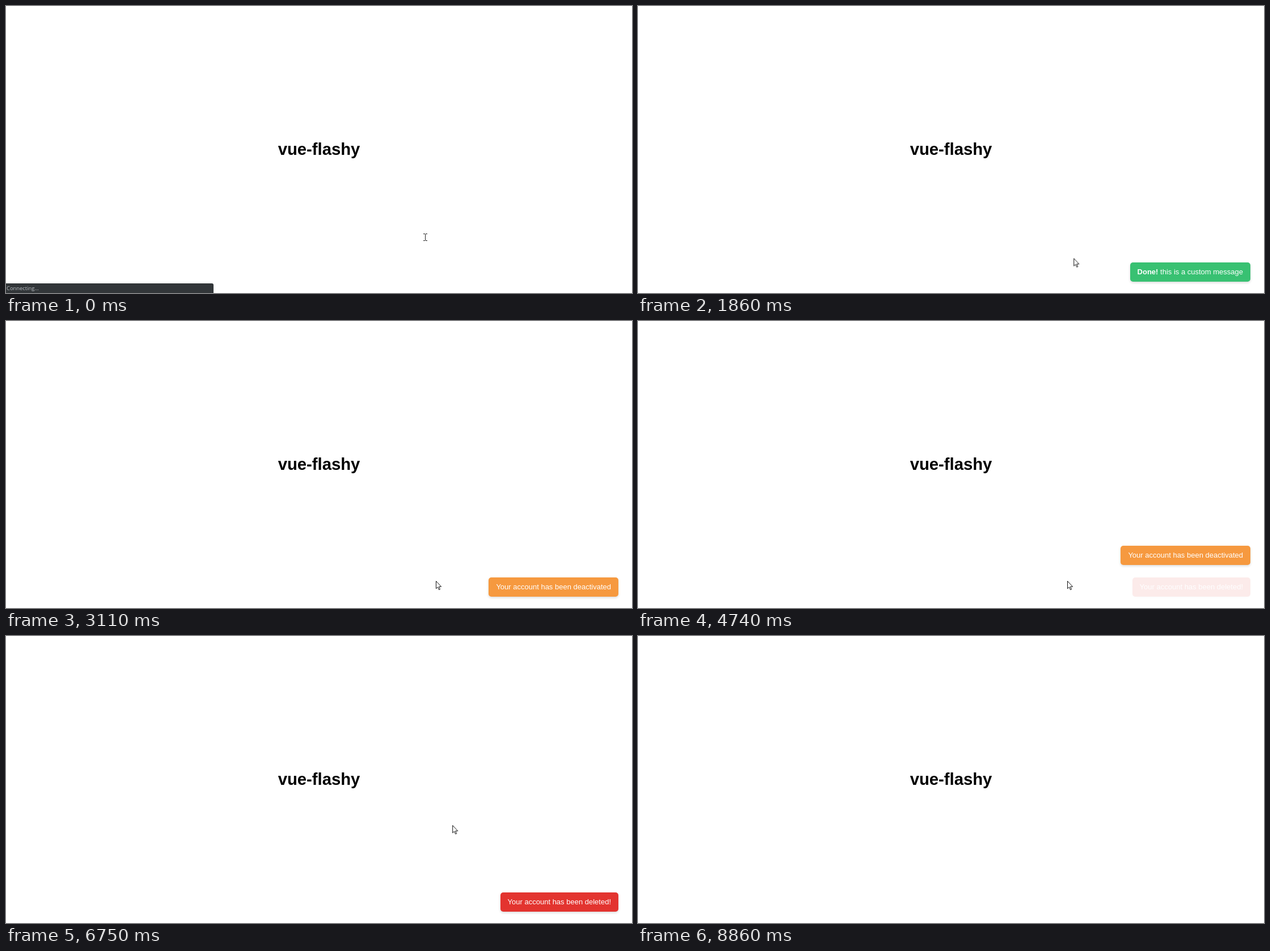
Write an HTML page that moves like this. It is 1104 by 507 pixels and loops after 9030 ms.

```html
<!DOCTYPE html>
<html lang="en">
<head>
<meta charset="utf-8">
<title>vue-flashy</title>
<style>
  html, body { margin: 0; width: 100%; height: 100%; overflow: hidden; background: #fff; }
  body { position: relative; font-family: "Liberation Sans", Arial, sans-serif; }
  body > * { position: absolute; margin: 0; white-space: nowrap; }

  h1 {
    left: 0; top: 233px; width: 1104px;
    font-size: 29.25px; line-height: 40px; text-align: center; color: #000;
  }

  .toast {
    right: 24px; top: 452.5px; height: 34.2px; padding: 0 13px;
    border-radius: 5px; box-shadow: 0 2px 4px rgba(0, 0, 0, .14);
    font-size: 13px; line-height: 34px; color: #fff;
    animation:
      appear .3s ease var(--in) backwards,
      vanish .3s ease var(--out) forwards,
      lift 1ms step-start var(--lift, 9s) forwards;
  }
  .success { background: #38c172; --in: 290ms; --lift: 2300ms; --out: 2780ms; }
  .warning { background: #f6993f; --in: 2300ms; --lift: 4710ms; --out: 5305ms; }
  .error { background: #e3342f; --in: 4710ms; --out: 7740ms; }

  .status {
    left: 0; top: 490px; width: 365px; height: 17px; padding-left: 1px;
    box-sizing: border-box; width: 366px; border-radius: 0 3px 0 0;
    background: #323639; color: #bdc1c6;
    font: 9.4px/17px "Open Sans", "Noto Sans", sans-serif;
    animation: vanish .2s linear 1150ms forwards;
  }

  .edge {
    left: 1017px; top: 506px; width: 50px; height: 1px;
    background: repeating-linear-gradient(90deg, #7a858f 0 1px, #fff 1px 2px);
    animation: appear 1ms step-start 8860ms backwards;
  }

  svg { left: 0; top: 0; overflow: visible; }
  .beam {
    translate: 736px 402px;
    fill: none; stroke: #222;
    animation: vanish 1ms step-start 80ms forwards;
  }
  .arrow {
    translate: 737px 406px;
    fill: #fff; stroke: #111;
    animation:
      appear 1ms step-start 80ms backwards,
      drift 930ms linear 700ms forwards,
      cross 690ms ease-in-out 1800ms forwards,
      back 550ms ease-in-out 2560ms forwards,
      nudge 70ms linear 3280ms forwards,
      settle 550ms linear 5200ms forwards,
      circle 950ms linear 6120ms forwards,
      leave 940ms linear 7070ms forwards;
  }

  @keyframes appear { from { opacity: 0; } }
  @keyframes vanish { to { opacity: 0; } }
  @keyframes lift { to { top: 396.8px; } }
  @keyframes drift {
    25% { translate: 740px 409px; }
    60% { translate: 754px 428px; }
    to { translate: 767px 445px; }
  }
  @keyframes cross { to { translate: 850px 475px; } }
  @keyframes back { to { translate: 758px 459px; } }
  @keyframes nudge { to { translate: 757px 459px; } }
  @keyframes settle {
    54% { translate: 755px 458px; }
    to { translate: 752px 457px; }
  }
  @keyframes circle {
    14% { translate: 788px 446px; }
    32% { translate: 838px 404px; }
    40% { translate: 846px 380px; }
    56% { translate: 800px 336px; }
    68% { translate: 735px 326px; }
    82% { translate: 670px 345px; }
    88% { translate: 657px 358px; }
    to { translate: 719px 338px; }
  }
  @keyframes leave {
    25% { translate: 762px 346px; }
    50% { translate: 822px 372px; }
    76.6% { translate: 888px 418px; }
    to { translate: 908px 509px; }
  }
</style>
</head>
<body>
<h1>vue-flashy</h1>
<div class="toast success"><b>Done!</b> this is a custom message</div>
<div class="toast warning">Your account has been deactivated</div>
<div class="toast error">Your account has been deleted!</div>
<div class="status">Connecting...</div>
<div class="edge"></div>
<svg class="beam" width="7" height="13"><path d="M0 .5H3M4 .5H7M3.5 1V12M0 12.5H3M4 12.5H7"/></svg>
<svg class="arrow" width="10" height="17"><path d="M.5 .5V13.8L3.5 11L5.5 15.8L7.5 15L5.5 10.3H9.6Z"/></svg>
<script>
  const LOOP = 9030;

  // Bursts of screen updates: first ms, last ms, count.
  const bursts = [
    [0, 80, 2], [320, 550, 4], [780, 930, 3], [1020, 1630, 9],
    [1860, 2490, 9], [2640, 3110, 7], [3280, 3350, 2], [4740, 5040, 5],
    [5270, 5500, 4], [5580, 5750, 3], [6200, 7070, 12], [7140, 7790, 9],
    [7850, 8010, 3], [8160, 8860, 2]
  ];
  const ticks = bursts.flatMap(([from, to, n]) =>
    Array.from({ length: n }, (_, i) => from + (to - from) * i / (n - 1)));

  const parts = document.getAnimations();
  parts.forEach(part => part.pause());
  const start = performance.now();

  // Hold every animation at the latest update, as a screen recorder does.
  function draw() {
    const t = (performance.now() - start) % LOOP;
    const now = ticks.findLast(tick => tick <= t + .5) ?? 0;
    parts.forEach(part => { part.currentTime = now; });
    requestAnimationFrame(draw);
  }
  draw();
</script>
</body>
</html>
```
